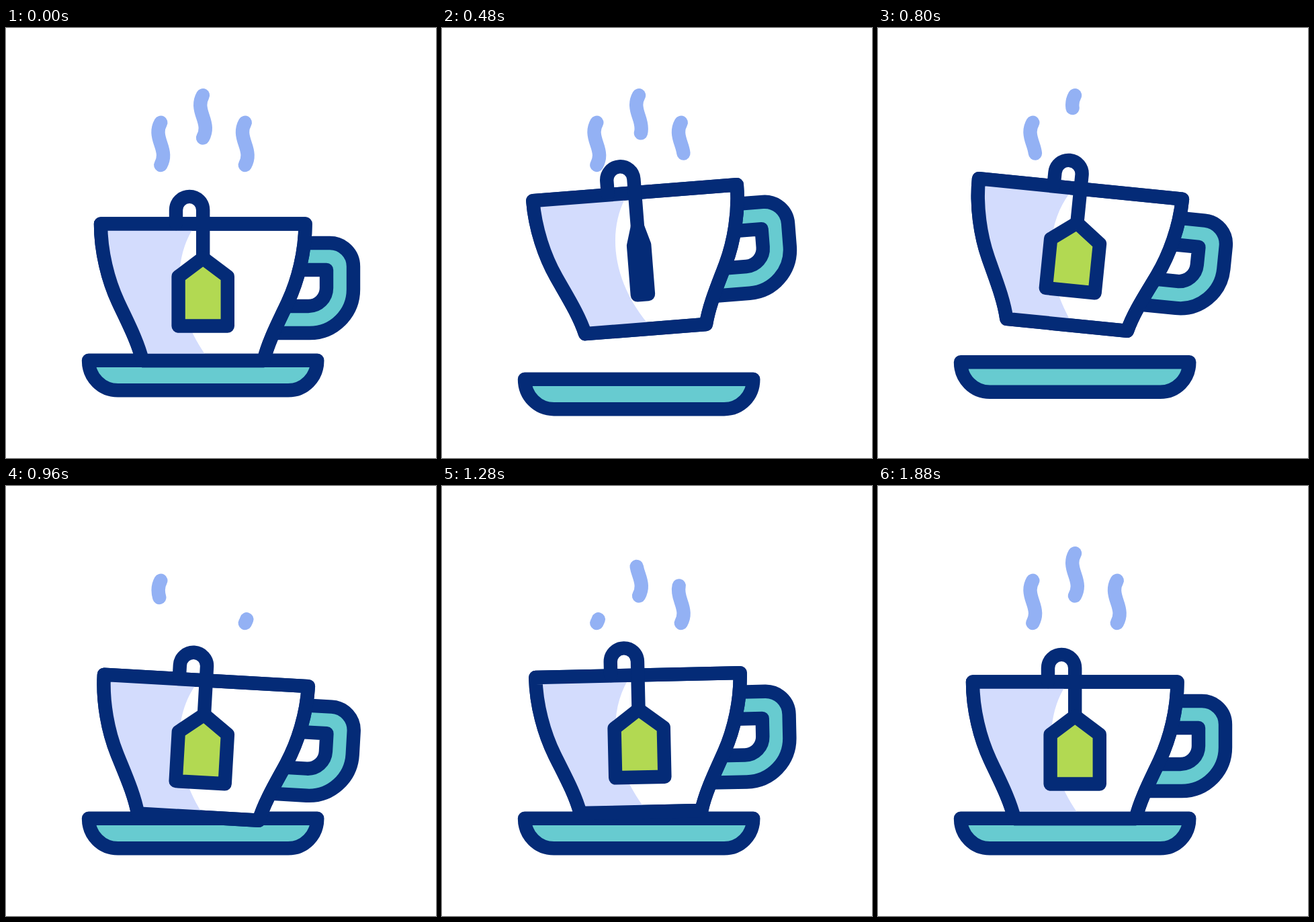
Recreate the animation shown at these times as an HTML page without scripts. Size 640 by 640 pixels, loop 2040 ms.

```html
<!DOCTYPE html>
<html lang="en">
<head>
<meta charset="utf-8">
<title>Tea cup</title>
<style>
  :root {
    --navy: #042b77;
    --teal: #67cbd0;
    --smooth: cubic-bezier(.333, 0, .667, 1);
  }
  html, body { margin: 0; width: 100%; height: 100%; overflow: hidden; background: #fff; }
  svg { display: block; width: 100vw; height: 100vh; }

  path { stroke: var(--navy); stroke-width: 20.4; stroke-linecap: round; stroke-linejoin: round; fill: none; }
  #body { fill: inherit; }
  .teal { fill: var(--teal); }
  .white { fill: #fff; }
  .line { fill: none; }
  .shade { fill: #d3dcfd; stroke: none; }

  .steam path {
    stroke: #93b1f4;
    stroke-dasharray: 100 200;
    animation: steam 2040ms linear infinite;
  }
  .steam .mid { animation-delay: 120ms; }
  .steam .left { animation-delay: 320ms; }

  .cup {
    transform-origin: 329px 372px;
    animation: jump 2040ms linear infinite, tilt 2040ms var(--smooth) infinite;
  }
  .saucer { animation: recoil 2040ms var(--smooth) infinite; }
  .tag { fill: #b2d952; animation: flip 2040ms var(--smooth) infinite; }

  /* wipes upward, then regrows from the bottom */
  @keyframes steam {
    0% { stroke-dashoffset: 0; }
    6.86% { stroke-dashoffset: 0; animation-timing-function: cubic-bezier(.333, 0, .667, .333); }
    38.73% { stroke-dashoffset: -101; animation-timing-function: step-end; }
    45.83% { stroke-dashoffset: 101; animation-timing-function: cubic-bezier(.27, .67, .5, 1); }
    76.47%, 100% { stroke-dashoffset: 0; }
  }
  /* two ballistic hops */
  @keyframes jump {
    0% { translate: 0 0; }
    15.69% { translate: 0 0; animation-timing-function: cubic-bezier(.333, .667, .667, 1); }
    31.37% { translate: 0 -65.5px; animation-timing-function: cubic-bezier(.333, 0, .667, .333); }
    47.06% { translate: 0 0; animation-timing-function: cubic-bezier(.333, .667, .667, 1); }
    56.86% { translate: 0 -17px; animation-timing-function: cubic-bezier(.333, 0, .667, .333); }
    66.67%, 100% { translate: 0 0; }
  }
  @keyframes tilt {
    0%, 15.69% { rotate: 0deg; }
    25.49% { rotate: -5deg; }
    41.18% { rotate: 6.2deg; }
    55.88% { rotate: -2deg; }
    73%, 100% { rotate: 0deg; }
  }
  @keyframes recoil {
    0%, 15.69% { translate: 0 0; }
    25.49% { translate: 0 31px; }
    42.16%, 47.06% { translate: 0 0; }
    53.92% { translate: 0 12px; }
    62.75%, 100% { translate: 0 0; }
  }
  @keyframes flip {
    0%, 9.8% { d: path("M293.2 342.5L329.8 370V443.5H256.6V370Z"); }
    33.8%, 100% { d: path("M293.2 342.5L256.6 370V443.5H329.8V370Z"); }
  }
</style>
</head>
<body>
<svg viewBox="0 0 640 640">
  <defs>
    <path id="body" d="M141 291.5C141 333 152 376 167 408C180 436 196 466 203 495H383.5C390.5 466 406.5 436 419.5 408C434.5 376 445.5 333 445.5 291.5Z"/>
    <clipPath id="inside"><use href="#body"/></clipPath>
  </defs>

  <g class="steam">
    <path class="left" pathLength="100" d="M230.3 204C236.1 193.5 234.6 184.6 230.3 172.3C226 160 224.5 151 230.3 140.7"/>
    <path class="mid" pathLength="100" d="M293 163.5C298.8 153 297.3 144.1 293 131.8C288.7 119.5 287.2 110.5 293 100.2"/>
    <path class="right" pathLength="100" d="M355.8 204C361.6 193.5 360.1 184.6 355.8 172.3C351.5 160 350 151 355.8 140.7"/>
  </g>

  <path class="saucer teal" d="M123 494.8H463.3C463.3 520 444 539.3 420 539.3H166.5C142.5 539.3 123 520 123 494.8Z"/>

  <g class="cup">
    <path class="teal" d="M435 320H482A35 35 0 0 1 517 355V389A65 65 0 0 1 452 454H398Z"/>
    <path class="white" d="M435 360H477V387A27 27 0 0 1 450 414H415Z"/>
    <use class="white" href="#body"/>
    <path class="shade" clip-path="url(#inside)" d="M130 291.5H283C248 340 246 420 303 495H130Z"/>
    <use class="line" href="#body"/>
    <path d="M253 291V271A20 20 0 0 1 293.2 271V342"/>
    <path class="tag" d="M293.2 342.5L329.8 370V443.5H256.6V370Z"/>
  </g>
</svg>
</body>
</html>
```
